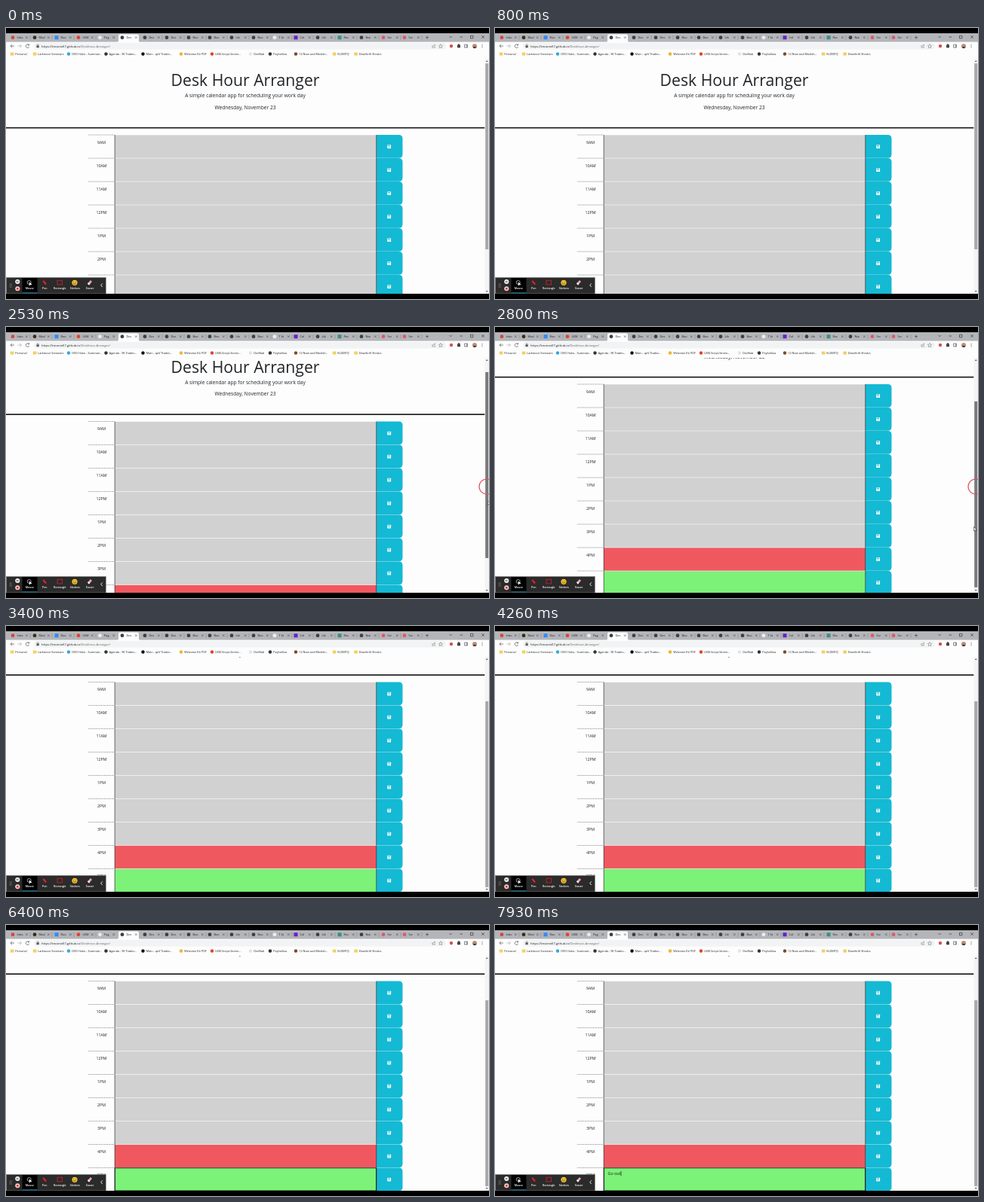
An HTML page for the animation above (8 s loop, 640 px wide and 360 px high).

```html
<!DOCTYPE html>
<html lang="en">
<head>
<meta charset="utf-8">
<title>Desk Hour Arranger</title>
<style>
html, body { margin: 0; width: 100%; height: 100%; overflow: hidden; background: #000; }
svg { display: block; width: 640px; height: 360px; }
text { font-family: "Open Sans", "Noto Sans", sans-serif; white-space: pre; }
</style>
</head>
<body>
<svg id="stage" viewBox="0 0 640 360"></svg>
<script>
const LOOP = 8000, STEP = 200 / 3, ROW = 31, MAX_SCROLL = 67.5;

const rect = (x, y, w, h, fill, more = '') =>
  `<rect x="${x}" y="${y}" width="${w}" height="${h}" fill="${fill}" ${more}/>`;
const dot = (x, y, r, fill, more = '') =>
  `<circle cx="${x}" cy="${y}" r="${r}" fill="${fill}" ${more}/>`;
const text = (x, y, size, str, fill = '#222', more = '') =>
  `<text x="${x}" y="${y}" font-size="${size}" fill="${fill}" ${more}>${str}</text>`;
const line = (d, stroke, width = .7, more = '') =>
  `<path d="${d}" fill="none" stroke="${stroke}" stroke-width="${width}" ${more}/>`;
const mid = 'text-anchor="middle"';

function tabStrip() {
  const globe = '#3c4043';
  const tabs = [
    [9, 'Inbo', '#d9453a'], [38, 'Mod', '#3a2c12'], [67, 'Roo', '#2d8cff'], [96, 'LKM', '#e2432a'],
    [124.5, 'Pag', '#e8edf0'], [154, 'Des', globe], [184, 'Des', globe], [213, 'Des', globe],
    [242, 'Boo', globe], [270, 'Boo', globe], [299, 'Lib', globe], [328, 'Boo', globe],
    [356, 'T kt', '#e9eef5'], [384, 'Col', '#6a1fd0'], [413, 'Lib', globe], [442, 'Res', '#3c8f86'],
    [471, 'Nat', globe], [500, 'Scr', '#e0576b'], [528, 'Scr', '#e0576b']];
  let s = rect(0, 7, 640, 12, '#b3b5b9') +
    '<path d="M147 19Q149 19 149 17V10.5Q149 8.5 151 8.5H174Q176 8.5 176 10.5V17Q176 19 178 19Z" fill="#fdfdfd"/>';
  tabs.forEach(([x, name, color], i) => {
    const square = i == 2 || i == 13 || i == 15;
    s += square ? rect(x - 2.5, 10.2, 5, 5, color) : dot(x, 12.7, 2.4, color);
    s += text(x + 5.5, 14.1, 3.9, name);
    s += line(`M${x + 17} 11.3l2.6 2.6m0-2.6l-2.6 2.6`, '#333', .5);
    if (i != 4 && i != 5) s += line(`M${x + 23} 10v5.5`, '#777', .4);
  });
  s += line('M556 12.6h4M558 10.6v4', '#333', .6);
  return s + line('M587.5 11l1.7 1.7l1.7-1.7M601.5 12h3.5M615.5 10.3h3.4v3.4h-3.4ZM630.3 10.2l3.4 3.4m0-3.4l-3.4 3.4', '#222', .6);
}

function addressBar() {
  let s = rect(0, 18.5, 640, 22.5, '#fdfdfd') + rect(37, 19.8, 546, 8.6, '#f1f3f4', 'rx="4.3"');
  s += line('M11 24H6M8.2 21.8L6 24l2.2 2.2', '#555');
  s += line('M15.5 24h5M18.3 21.8l2.2 2.2l-2.2 2.2', '#aaa');
  s += line('M30.3 22.6A2.3 2.3 0 1 0 30.7 24.8M30.6 21v1.9h-1.9', '#555');
  s += rect(40.5, 23.3, 3.2, 2.8, '#555') + line('M41.1 23.5v-.9a1 1 0 0 1 2 0v.9', '#555', .5);
  s += text(47, 25.5, 4.15, 'https://tmarnell7.github.io<tspan fill="#666">/Deskhour-Arranger/</tspan>');
  s += line('M565 23v3h3.5v-1.5M566 24.6q.2-2 2.7-2m-1-1l1.1 1l-1.1 1', '#666', .5);
  s += line('M576 21.5l.8 1.7l1.8.2l-1.3 1.3l.3 1.8l-1.6-.9l-1.6.9l.3-1.8l-1.3-1.3l1.8-.2Z', '#666', .5);
  s += dot(590, 24, 2.2, '#d2524b') + rect(598, 22.2, 4, 4, '#444', 'rx=".7"') + dot(600, 22, 1, '#444');
  s += line('M607.5 22h4v4h-4ZM610.2 22v4', '#444', .6);
  s += dot(621, 24, 3, '#b98f78') + '<path d="M618.6 25.8q2.4-2 4.8 0q-2.4 2.4-4.8 0" fill="#4b342d"/>';
  for (const y of [22.2, 24, 25.8]) s += dot(631, y, .5, '#444');
  return s;
}

function bookmarks() {
  const folder = '#f5cf5b';
  const items = [
    [8, 'Personal', folder], [38, 'Larkmoor Seminars', folder], [83, 'DVO Hubs - Summari...', '#35a7dd'],
    [132.5, 'Agenda - 9K Trades...', '#333'], [181.5, 'Main - qoV Trades...', '#111'],
    [232, 'Welcome Kit PDF', '#f0b429'], [273, 'LKM-Script-Semin...', '#e2432a'],
    [324, 'DevNub', '#e4e4e4'], [350, 'Payhollow', '#333'], [384, '12 Neat and Modish...', '#7a4a2c'],
    [435, 'KLDMTQ', folder], [463.5, 'Dewthrift Shrubs', folder]];
  return items.map(([x, name, color]) =>
    (color == folder ? rect(x - 2.2, 32.6, 4.6, 3.8, color, 'rx=".5"') : dot(x, 34.5, 2.2, color)) +
    text(x + 4.3, 35.8, 3.75, name)).join('');
}

function hourRow(label, i) {
  const y = 142 + ROW * i;
  const fill = i < 7 ? '#d1d1d1' : i == 7 ? '#f05860' : '#7cf279';
  return line(`M109 ${y}h35`, '#777', .6, 'stroke-dasharray="1 .4"') +
    text(126.5, y + 11.8, 5.3, label, '#222', mid) +
    rect(144, y + .3, 347, ROW - .6, fill) +
    line(`M144.2 ${y}v${ROW}`, '#333', .7) +
    `<path d="M491 ${y}H520.5q5 0 5 5V${y + 25.8}q0 5-5 5H491Z" fill="#14b9d4"/>` +
    line(`M490.7 ${y}v${ROW}`, '#333', .7) +
    rect(505.3, y + 13.2, 4.8, 4.8, '#fff', 'rx=".6"') +
    rect(506.1, y + 13.9, 2.8, 1.1, '#14b9d4') + dot(507.7, y + 16.5, .7, '#14b9d4');
}

function page() {
  const hours = ['9AM', '10AM', '11AM', '12PM', '1PM', '2PM', '3PM', '4PM', '5PM'];
  return text(317, 77.2, 21.2, 'Desk Hour Arranger', '#212529', mid) +
    text(317, 92.4, 6.64, 'A simple calendar app for scheduling your work day', '#212529', mid) +
    text(317, 107.8, 6.66, 'Wednesday, November 23', '#212529', mid) +
    rect(0, 131.8, 634.5, 1.6, '#111') +
    hours.map(hourRow).join('') +
    `<g id="focus">${rect(144.3, 390.3, 346.4, 30.2, 'none', 'stroke="#111" stroke-width=".9"')}
      ${text(149.6, 399.4, 5.35, '', '#111', 'id="entry"')}
      ${rect(0, 394.4, .6, 6.4, '#000', 'id="caret"')}</g>`;
}

function drawBar() {
  const names = ['Mouse', 'Pen', 'Rectangle', 'Stickers', 'Eraser'];
  let s = rect(.4, 331.4, 132, 21.6, '#2b2b2b', 'stroke="#8a8a8a" stroke-width=".7"') +
    rect(21.5, 332, 20, 20.5, '#000') + rect(21.5, 351.5, 20, 1, '#3f9fc4');
  for (let i = 0; i < 6; i++) s += dot(5.3 + i % 2 * 1.8, 340 + (i >> 1) * 2, .5, '#aaa');
  s += dot(15.3, 337, 3, '#fff') + line('M14.5 335.7v2.6M16.1 335.7v2.6', '#222', .7);
  s += dot(15.3, 346.3, 3, '#f6d5d6') + rect(14, 345, 2.6, 2.6, '#e0322f');
  names.forEach((name, i) => s += text(31.3 + 20 * i, 347.3, 3.5, name, '#fff', mid + ' font-weight="600"'));
  s += dot(30.7, 338, 2.5, 'none', 'stroke="#fff" stroke-width=".6"') +
    '<path d="M30.5 337.5l4.2 3.2l-2.3.2l-1.2 1.8Z" fill="#fff"/>';
  s += line('M49.3 336l3.8 4.5', '#e3202a', 2.3);
  s += rect(68, 335.3, 6.5, 5.6, 'none', 'stroke="#c81f2b" stroke-width=".9"');
  s += dot(91, 338.3, 3.6, '#f7c331') + line('M89 339.3q2 2 4 0', '#5a3b08', .7) +
    dot(89.7, 337.4, .5, '#5a3b08') + dot(92.3, 337.4, .5, '#5a3b08');
  s += line('M109 340.5l4-4.5', '#f3a3a8', 2.8) + line('M109 340.5l1.2-1.35', '#fff', 2.8);
  return s + line('M127.7 339.4l-2 2.3l2 2.3', '#fff', .9);
}

document.getElementById('stage').innerHTML =
  rect(0, 7, 640, 346, '#fdfdfd') +
  '<clipPath id="view"><rect y="41" width="640" height="312"/></clipPath>' +
  `<g clip-path="url(#view)"><g id="page">${page()}</g>` +
  rect(634.5, 41, 5.5, 312, '#f4f4f4') +
  '<path d="M635.7 45l1.5-2l1.5 2ZM635.7 349l1.5 2l1.5-2Z" fill="#666"/>' +
  rect(635.2, 47, 4, 247, '#a8a8a8', 'id="thumb"') +
  dot(637, 212, 10, 'none', 'id="ring" stroke="#e0505c" stroke-width="1.2"') +
  '<path id="cursor" d="M0 0V5.4L1.3 4.2L2.2 6L3 5.6L2.2 3.9H3.8Z" fill="#fff" stroke="#111" stroke-width=".5"/></g>' +
  tabStrip() + addressBar() + bookmarks() + drawBar() +
  rect(0, 0, 640, 7, '#000') + rect(0, 353, 640, 7, '#000');

// Linear path through [time, value] points.
function track(points, t) {
  const i = points.findIndex(p => p[0] > t);
  if (i == 0) return points[0][1];
  if (i < 0) return points[points.length - 1][1];
  const [t0, a] = points[i - 1], [t1, b] = points[i];
  return a + (b - a) * (t - t0) / (t1 - t0);
}

const scrollPath = [[2200, 0], [2533, 16.4], [2800, 66], [2930, MAX_SCROLL]];
const cursorX = [[1000, 646], [1400, 636.8], [2200, 636.8], [2533, 638.5], [2800, 634.5], [3200, 634.5], [3500, 646]];
const cursorY = [[1000, 204], [1400, 209.5], [2200, 209.5], [2533, 231], [2800, 265.5], [3500, 262]];
const keyTimes = [7200, 7400, 7660, 7730, 7860, 7930];
const FOCUS = 5865, BLINK = 533;

const el = id => document.getElementById(id);
const show = (id, on) => el(id).setAttribute('visibility', on ? 'visible' : 'hidden');

function draw(now) {
  const t = Math.floor((now % LOOP + 4) / STEP) * STEP;
  const scroll = track(scrollPath, t);
  const pressed = t >= 1930 && t < 3200;
  el('page').setAttribute('transform', `translate(0 ${-scroll})`);
  el('thumb').setAttribute('y', 47 + scroll / MAX_SCROLL * 53);
  el('thumb').setAttribute('fill', pressed ? '#787878' : '#a8a8a8');
  el('cursor').setAttribute('transform', `translate(${track(cursorX, t)} ${track(cursorY, t)})`);
  show('ring', pressed);

  const focused = t >= FOCUS;
  const typed = keyTimes.filter(k => t + 5 >= k).length;
  el('entry').textContent = 'Go out'.slice(0, typed);
  el('caret').setAttribute('x', 149.8 + (typed ? el('entry').getComputedTextLength() : 0));
  show('focus', focused);
  show('caret', focused && (typed || Math.floor((t - FOCUS) / BLINK) % 2 == 0));
}

const start = performance.now();
(function tick() {
  draw(performance.now() - start);
  requestAnimationFrame(tick);
})();
</script>
</body>
</html>
```
